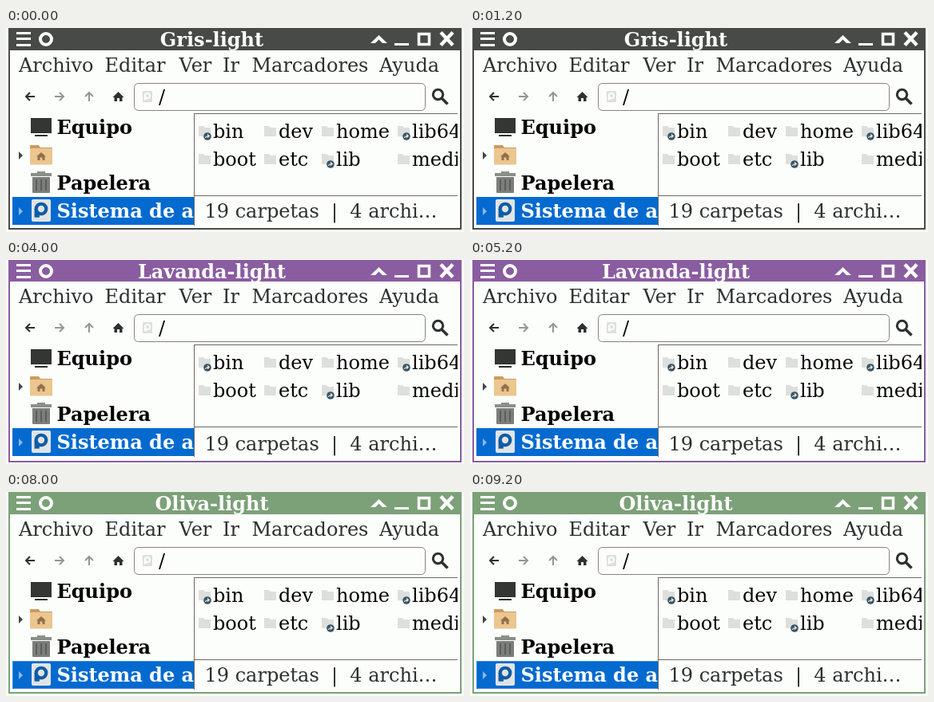
Animation of 573 by 256 pixels, one loop 10 s. Source, as an HTML page:

```html
<!DOCTYPE html>
<html lang="es">
<head>
<meta charset="utf-8">
<title>Temas de ventana</title>
<style>
html, body { margin: 0; width: 100%; height: 100%; overflow: hidden; }
#stage { position: relative; width: 573px; height: 256px; overflow: hidden; }
.theme { position: absolute; left: 0; top: 0; opacity: 0; animation: show 10s step-end infinite; }
@keyframes show { 0% { opacity: 1; } 20%, 100% { opacity: 0; } }
text { font: 24px "DejaVu Serif", "Noto Serif", serif; white-space: pre; }
.b { font-weight: bold; }
</style>
</head>
<body>
<div id="stage"></div>
<script>
const light = {
  bg: '#fcfefc', view: '#fcfefc', out: '#fcfefc', ink: '#2c3030', label: '#040404', dim: '#949694',
  entry: '#8a8078', line: '#6c6a64', sel: '#046ad0', folder: '#dcdfdc', badge: '#3c5460',
  mini: '#dce0dc', hole: '#fcfefc', screen: '#343634', edge: '#2c2c2c', tri: '#444644', title: '#fcfefc'
};
const dark = {
  bg: '#343634', view: '#2c2e2c', out: '#2a2c2a', ink: '#ececec', label: '#fcfefc', dim: '#848684',
  entry: '#222422', line: '#222422', sel: '#1c54a0', folder: '#dcdedc', badge: '#44647c',
  mini: '#dcdedc', hole: '#2c2e2c', screen: '#2f312f', edge: '#5c5e5c', tri: '#b4b6b4', title: '#040404'
};
// dy shifts the window body, grow lowers its bottom edge
const themes = [
  { ...light, name: 'Gris-light', frame: '#484a48', dy: 0, grow: 0 },
  { ...dark, name: 'Lavanda-dark', frame: '#8a5ca0', dy: -1, grow: 2 },
  { ...light, name: 'Lavanda-light', frame: '#8a5ca0', dy: -1, grow: 1 },
  { ...dark, name: 'Oliva-dark', frame: '#7ca078', dy: 0, grow: 1 },
  { ...light, name: 'Oliva-light', frame: '#7ca078', dy: 0, grow: 0, focus: true }
];

const rect = (x, y, w, h, fill, more = '') =>
  `<rect x="${x}" y="${y}" width="${w}" height="${h}" fill="${fill}" ${more}/>`;
const text = (x, y, s, fill, more = '') => `<text x="${x}" y="${y}" fill="${fill}" ${more}>${s}</text>`;
const path = (d, fill, more = '') => `<path d="${d}" fill="${fill}" ${more}/>`;
const stroke = (d, color, w) => path(d, 'none', `stroke="${color}" stroke-width="${w}"`);
const clip = (x, y, w, h, body) =>
  `<svg x="${x}" y="${y}" width="${w}" height="${h}" viewBox="${x} ${y} ${w} ${h}">${body}</svg>`;

function titleBar(t) {
  const c = t.title;
  return rect(3, 0, 567, 28, t.frame) +
    [5, 12, 20].map(y => rect(13, y, 18, 3, c)).join('') +
    `<circle cx="50" cy="14" r="7" fill="none" stroke="${c}" stroke-width="4"/>` +
    text(257.5, 23, t.name, c, 'class="b" text-anchor="middle"') +
    path('M456 19L466.5 9L477 19H471L466.5 14.5L462 19Z', c) +
    rect(486, 19, 18, 3, c) +
    rect(516.5, 7.5, 13, 13, 'none', `stroke="${c}" stroke-width="3.5"`) +
    stroke('M544 5.5L559 21.5M559 5.5L544 21.5', c, 4.5);
}

function drive(x, y, w, h, body, ring, hole) {
  const cx = x + w / 2, cy = y + h * .43, r = w * .35;
  return rect(x, y, w, h, body, `rx="${w / 12}"`) +
    `<circle cx="${cx}" cy="${cy}" r="${r}" fill="${ring}"/>` +
    rect(cx - r, cy, r * .75, h * .38, ring) +
    `<circle cx="${cx}" cy="${cy}" r="${r * .5}" fill="${hole}"/>`;
}

function toolbar(t) {
  const arrow = (angle, x, color) =>
    `<g transform="translate(${x} 86) rotate(${angle})">` +
    stroke('M6 0H-5M0 -5L-5 0L0 5', color, 2) + '</g>';
  return arrow(0, 30, t.ink) + arrow(180, 67, t.dim) + arrow(90, 104, t.dim) +
    path('M133.5 87L140.5 80L147.5 87H145.5V92H142V88H139V92H135.5V87Z', t.ink) +
    rect(160.5, 69.5, 364, 34, t.view, `rx="5" stroke="${t.entry}"`) +
    drive(171, 79, 12, 14, t.mini, t.hole, t.mini) +
    text(191, 95, '/', t.label) +
    `<circle cx="540.5" cy="83.5" r="6.2" fill="none" stroke="${t.ink}" stroke-width="3"/>` +
    stroke('M545 88L552.5 95.5', t.ink, 3.6);
}

function sidebar(t) {
  const tri = (y, c) => path(`M16 ${y - 5}L21 ${y}L16 ${y + 5}Z`, c);
  const focus = t.focus
    ? rect(8.5, 212.5, 227, 34, 'none', 'stroke="#6ca8e0" stroke-dasharray="1 1"') : '';
  return clip(8, 107, 228, 141,
    rect(8, 107, 228, 141, t.view) +
    rect(8, 212, 228, 35, t.sel) + focus +
    rect(31, 113, 26, 19, t.screen, 'rx="1"') +
    rect(31, 131, 26, 1, t.edge) + rect(31, 113, 26, 1, t.edge) +
    rect(36, 134, 16, 2, t.edge) +
    text(63.5, 133, 'Equipo', t.label, 'class="b"') +
    tri(160, t.tri) +
    path('M30 148Q30 147 31 147H41L43 150H57Q58 150 58 151V171H30Z', '#c89c64') +
    rect(30, 151, 28, 20.5, '#ecc68e', 'rx="1"') +
    path('M38 161.5L44 156L50 161.5H48.5V166H45.5V162.5H42.5V166H39.5V161.5Z', '#947048') +
    path('M39 182V180H49V182H57V186H31V182Z', '#8c8e8c') +
    path('M33 187H55V206Q55 207 54 207H34Q33 207 33 206Z', '#7c7e7c') +
    [37, 43, 49].map(x => rect(x, 190, 2, 14, '#5c5e5c')).join('') +
    text(63.5, 203, 'Papelera', t.label, 'class="b"') +
    tri(230, '#8cb8e4') +
    drive(32, 215, 24, 28, '#e0e4e4', '#105ca8', '#e0e4e4') +
    text(63.5, 238, 'Sistema de archivos', '#fcfefc', 'class="b"'));
}

function item(t, x, y, name, linked) {
  const badge = linked
    ? `<circle cx="${x + 11}" cy="${y - 2}" r="4.8" fill="${t.badge}"/>` +
      stroke(`M${x + 8.5} ${y}Q${x + 9} ${y - 2.5} ${x + 13} ${y - 2.5}M${x + 11} ${y - 4.5}L${x + 13.2} ${y - 2.5}L${x + 11} ${y - .5}`, '#e8ecec', 1.2)
    : '';
  return path(`M${x} ${y - 15}H${x + 6}L${x + 8} ${y - 13}H${x + 15}V${y - 2}H${x}Z`, t.folder) +
    badge + text(x + 18, y, name, t.label);
}

function files(t) {
  const bottom = 210 + t.grow - t.dy;
  const end = bottom - (t.dy ? 1 : 0);
  const cols = [241, 323, 395, 490];
  const row = (names, y, links) => names.map((n, i) => item(t, cols[i], y, n, links.includes(i))).join('');
  const top = t.dy ? end - 1 : end;
  return clip(235, 107, 330, top - 106,
    rect(235, 107, 330, top - 106, t.view) +
    row(['bin', 'dev', 'home', 'lib64'], 138, [0, 3]) +
    row(['boot', 'etc', 'lib', 'media'], 173, [2]) +
    rect(235, 107, 330, 1, t.line) +
    rect(235, top, 330, 1, t.line)) +
    rect(235, 107, 1, 141, t.line);
}

function scene(t) {
  const menu = [[16, 'Archivo'], [123.5, 'Editar'], [216.5, 'Ver'], [271, 'Ir'], [307.5, 'Marcadores'], [467, 'Ayuda']];
  return rect(0, 0, 573, 256, t.out) +
    rect(3, 0, 567, 253 + t.grow, t.frame) +
    rect(5, 28 + t.dy, 563, 223 + t.grow - t.dy, t.bg) +
    titleBar(t) +
    rect(5, 28 + t.dy, 563, 1, t.bg) +
    `<g transform="translate(0 ${t.dy})">` +
    menu.map(([x, s]) => text(x, 55, s, t.ink)).join('') +
    toolbar(t) + sidebar(t) + files(t) + '</g>' +
    text(248.5, 238 + t.grow, '19 carpetas  |  4 archi…', t.ink);
}

document.getElementById('stage').innerHTML = themes.map((t, i) =>
  `<svg class="theme" width="573" height="256" style="animation-delay:${i ? i * 2 - 10 : 0}s">${scene(t)}</svg>`
).join('');
</script>
</body>
</html>
```
